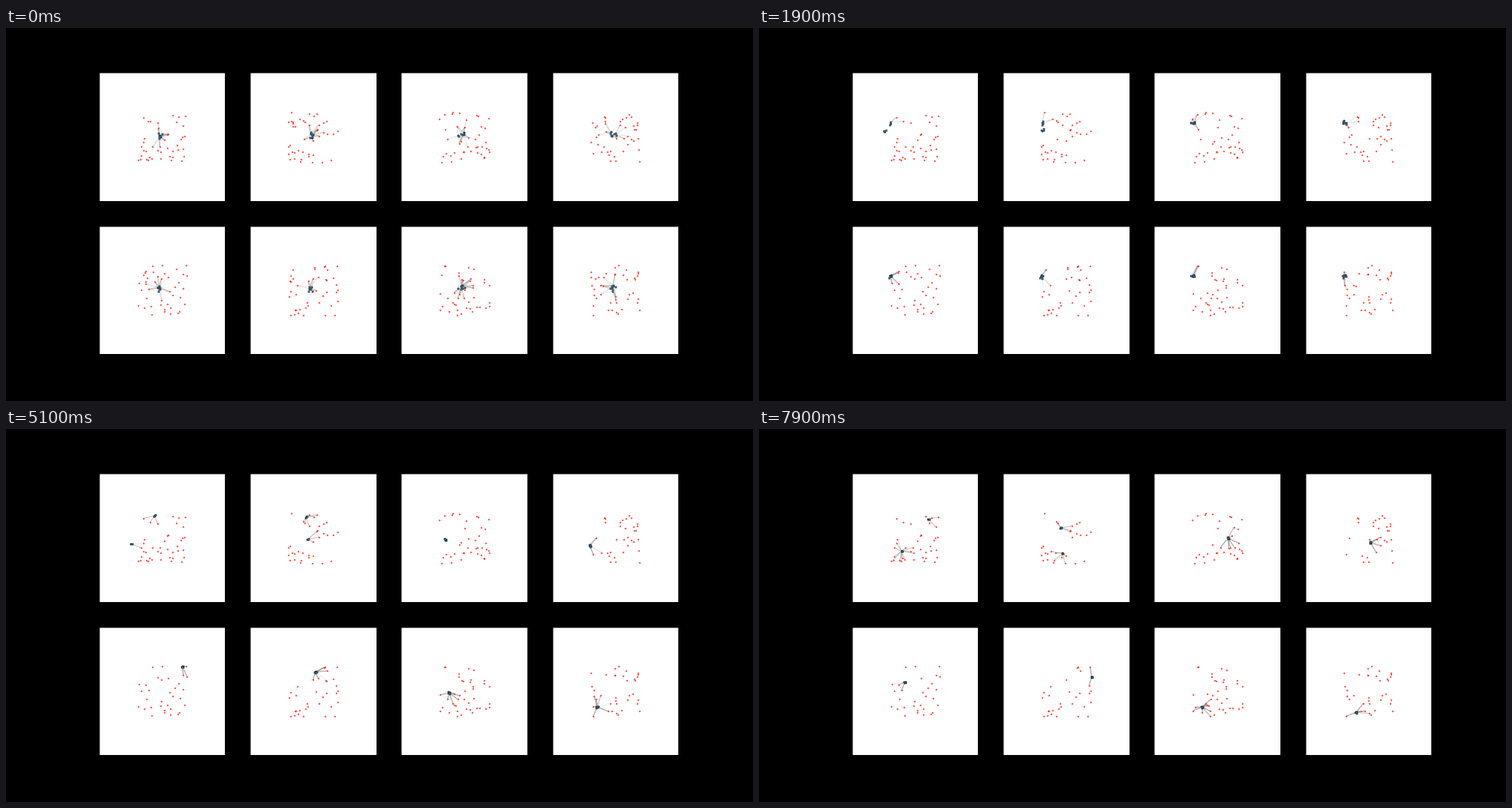
A matplotlib script for the animation above (8000 ms loop, 1000x500 px).

```python
import numpy as np
import matplotlib.pyplot as plt
from matplotlib.animation import FuncAnimation
from matplotlib.collections import LineCollection
from matplotlib.patches import Rectangle

W, H = 1000, 500
FRAMES, STEP = 80, 100
FOOD, AGENTS = 43, 8
FIELD, SENSE, EAT = 34, 17, 3.5

COLS = [(125.5, 293), (327.5, 496), (529.5, 698), (732.5, 900)]
ROWS = [(60.5, 232), (266.5, 437)]

# All swarms leave the middle the same way, then each takes its own route
KEYS = np.array([0, 7, 19, 32, 51, 67, 79])
START = [(-4, -3), (-15, -14), (-33, -19)]
ROUTES = [
    [(-25, -21), (-10, -30), (-2, -23), (18, -25)],
    [(-42, -17), (-10, -29), (12, -25), (-8, -14)],
    [(-22, -10), (-26, 2), (-5, 3), (14, 0)],
    [(-14, 6), (-35, 10), (-12, 16), (2, 6)],
    [(-5, -25), (27, -33), (4, -23), (-14, -12)],
    [(-10, -35), (3, -26), (13, -17), (34, -19)],
    [(-26, -13), (-21, 2), (-27, 14), (-21, 21)],
    [(-12, 3), (-25, 21), (-33, 23), (-17, 28)],
]
# Panels whose swarm breaks in two, and how far apart the halves drift
SPLITS = {0: (-36, 42), 1: (3, 34)}

rng = np.random.default_rng(12)
clock = np.arange(FRAMES)


def glide(points):
    """Smooth cubic path through the waypoints, one position per frame."""
    p = np.array(points, float)
    slope = np.gradient(p, KEYS, axis=0)
    i = np.clip(np.searchsorted(KEYS, clock, side="right") - 1, 0, len(KEYS) - 2)
    span = (KEYS[i + 1] - KEYS[i])[:, None]
    u = (clock - KEYS[i])[:, None] / span
    return ((1 + 2 * u) * (1 - u) ** 2 * p[i] + u * (1 - u) ** 2 * span * slope[i]
            + u * u * (3 - 2 * u) * p[i + 1] + u * u * (u - 1) * span * slope[i + 1])


def distances(agents, food):
    return np.linalg.norm(agents[..., :, None, :] - food, axis=-1)


class Panel:
    def __init__(self, k, centre):
        path = glide(START + ROUTES[k]) + centre
        drift = np.clip((clock - 7) / 50, 0, 1)[:, None] * SPLITS.get(k, (0, 0))
        # The swarm closes up while it travels
        spread = 0.6 + 3 * np.exp(-clock / 35)
        angle = rng.uniform(0, 2 * np.pi, AGENTS) + 0.02 * clock[:, None]
        reach = rng.uniform(0.2, 1.4, AGENTS) * spread[:, None]
        ring = np.stack([np.cos(angle), np.sin(angle)], axis=-1) * reach[..., None]
        half = (np.arange(AGENTS) % 2)[None, :, None]
        self.agents = path[:, None] + half * drift[:, None] + ring

        self.food = rng.uniform(-FIELD, FIELD, (FOOD, 2)) + centre
        hit = distances(self.agents, self.food).min(axis=1) < EAT
        self.end = np.where(hit.any(axis=0), hit.argmax(axis=0), FRAMES)

    def state(self, frame):
        agents, food = self.agents[frame], self.food[self.end > frame]
        near = np.argwhere(distances(agents, food) < SENSE)
        return agents, food, [(agents[a], food[f]) for a, f in near]


fig = plt.figure(figsize=(W / 100, H / 100), dpi=100, facecolor="black")
ax = fig.add_axes([0, 0, 1, 1])
ax.set_xlim(0, W)
ax.set_ylim(H, 0)
ax.axis("off")

panels = []
for top, bottom in ROWS:
    for left, right in COLS:
        ax.add_patch(Rectangle((left, top), right - left, bottom - top,
                               fc="white", ec="none", snap=False))
        middle = ((left + right) / 2, (top + bottom) / 2)
        panels.append(Panel(len(panels), middle))

links = LineCollection([], colors="#8f8880", linewidths=0.4, alpha=0.28, zorder=2)
ax.add_collection(links)
dots, = ax.plot([], [], "o", color="#ff1408", ms=1.45, mew=0, zorder=3)
bodies, = ax.plot([], [], "o", mfc="#4682b4", mec="#20282c", ms=1.75, mew=0.4, zorder=4)


def draw(frame):
    agents, food, lines = zip(*(p.state(frame) for p in panels))
    links.set_segments(sum(lines, []))
    dots.set_data(*np.concatenate(food).T)
    bodies.set_data(*np.concatenate(agents).T)
    return links, dots, bodies


anim = FuncAnimation(fig, draw, frames=FRAMES, interval=STEP, repeat=True, repeat_delay=0)
plt.show()
```
